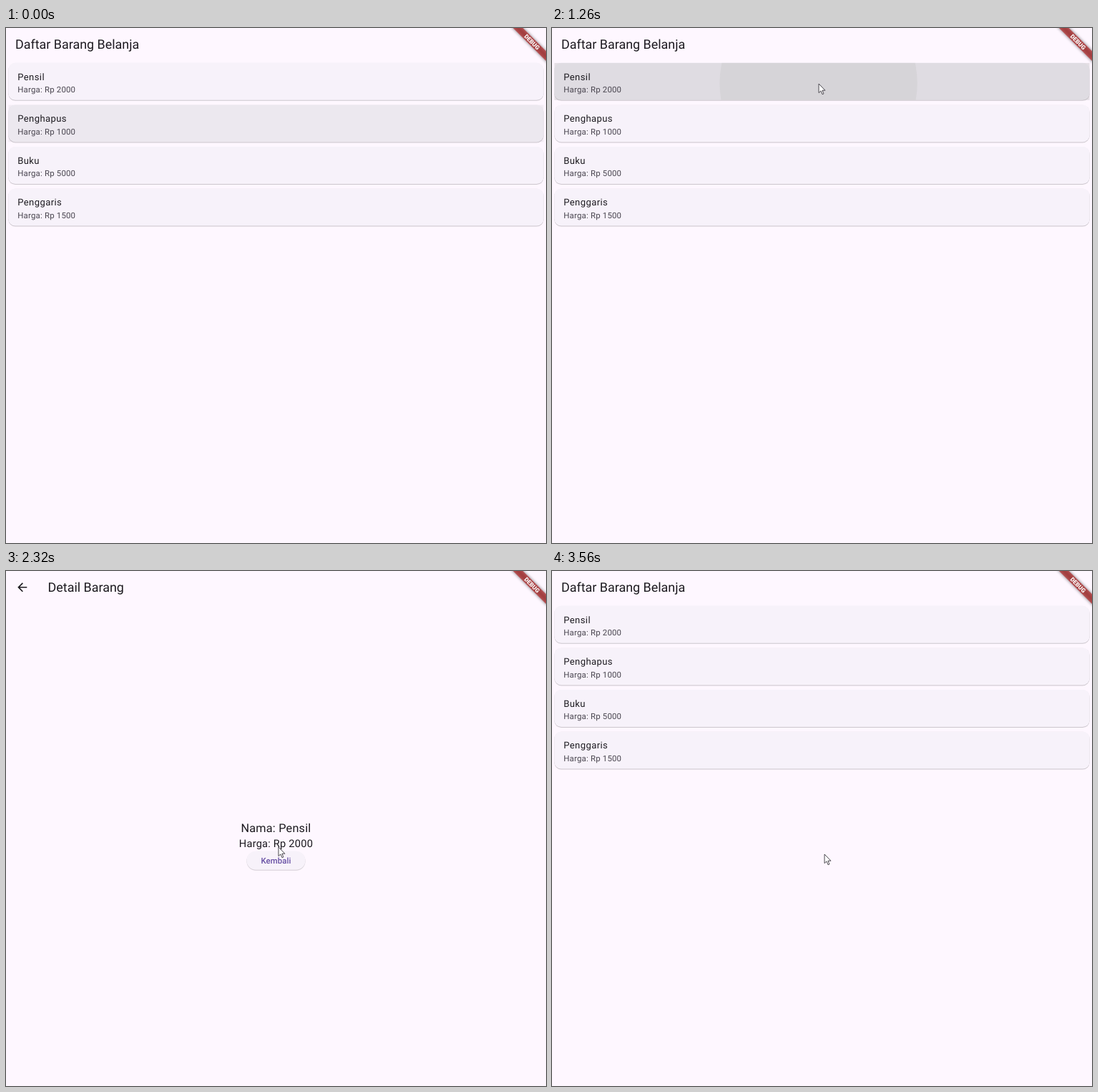
An HTML page for the animation above (3640 ms loop, 755x720 px).

```html
<!DOCTYPE html>
<html lang="id">
<head>
<meta charset="utf-8">
<title>Daftar Barang Belanja</title>
<style>
  html, body { margin: 0; width: 100%; height: 100%; overflow: hidden; background: #fef7ff; }
  svg { display: block; width: 100vw; height: 100vh; }
  text { font-family: Roboto, sans-serif; fill: #1d1b20; text-rendering: geometricPrecision; }
  .bar { font-size: 22px; }
  .name { font-size: 16px; letter-spacing: .5px; }
  .price { font-size: 14px; letter-spacing: .25px; fill: #49454f; }
  .mid { text-anchor: middle; letter-spacing: .25px; }
  .label { font-size: 14px; font-weight: 500; letter-spacing: .1px; text-anchor: middle; fill: #6750a4; }
  .card { fill: #f7f2fa; filter: drop-shadow(0 1px .8px rgba(0, 0, 0, .24)); }
  .banner { font-size: 10.2px; font-weight: 900; text-anchor: middle; fill: #fff; }
  .cursor path { fill: #fff; stroke: #37343c; stroke-width: .9; stroke-linejoin: round; }
</style>
</head>
<body>
<svg viewBox="0 0 755 720">
  <defs>
    <clipPath id="rowClip"><rect x="4" y="60" width="920" height="64"/></clipPath>
    <clipPath id="btnClip"><rect x="413.5" y="481.5" width="101" height="32" rx="16"/></clipPath>
    <filter id="soft" x="-20%" y="-100%" width="140%" height="300%"><feGaussianBlur stdDeviation="2.6"/></filter>
  </defs>
  <rect width="755" height="720" fill="#fef7ff"/>
  <g transform="scale(.8135)">
    <g id="list">
      <rect width="929" height="886" fill="#fef7ff"/>
      <text class="bar" x="16" y="35.3">Daftar Barang Belanja</text>
      <g id="rows"></g>
    </g>
    <rect id="scrim" width="929" height="886" fill="#fef7ff"/>
    <g id="detail">
      <rect width="929" height="886" fill="#fef7ff"/>
      <path transform="translate(16 16)" fill="#1d1b20" d="M20 11H7.83l5.59-5.59L12 4l-8 8 8 8 1.41-1.41L7.83 13H20z"/>
      <text class="bar" x="72" y="35.3">Detail Barang</text>
      <text class="mid" x="464" y="448.2" font-size="20">Nama: Pensil</text>
      <text class="mid" x="464" y="474.8" font-size="18">Harga: Rp 2000</text>
      <rect id="btn" x="413.5" y="481.5" width="101" height="32" rx="16" fill="#f7f2fa"/>
      <g clip-path="url(#btnClip)" fill="#6750a4">
        <rect id="btnHover" x="413.5" y="481.5" width="101" height="32"/>
        <circle id="btnRipple" cx="468.5" cy="496"/>
      </g>
      <text class="label" x="464" y="502.5">Kembali</text>
    </g>
    <g transform="translate(928 0) rotate(45)">
      <rect x="-44" y="28" width="88" height="12" fill="#000" opacity=".5" filter="url(#soft)"/>
      <rect x="-44" y="28" width="88" height="12" fill="#b71c1c" opacity=".63"/>
      <text class="banner" x="0" y="37.6">DEBUG</text>
    </g>
  </g>
  <g id="cursor" class="cursor">
    <path id="arrow" d="M0 0V12.6L2.9 9.9 5 14.7 6.9 13.9 4.9 9.2H8.9Z"/>
    <path id="hand" d="M-1.3 1.2C-1.3-.3 1.3-.3 1.3 1.2V5.6C1.6 4.6 3.6 4.8 3.6 6.1 4 5.2 5.7 5.5 5.7 6.8 6.2 6 7.6 6.4 7.6 7.6V11.4C7.6 13.2 6.2 14 6.2 16.3H-1.4C-1.4 14.3-4.4 12-5.2 9.3-5.5 8-3.9 7.6-3 8.8L-1.3 10.6Z"/>
  </g>
</svg>
<script>
const LOOP = 3640;
const PUSH = 1202, PUSH_SHOWN = 1300, POP = 3240, ZOOM = 300;
const TAP = 1160, BTN_HOVER = 2760, BTN_TAP = 3140;
const $ = id => document.getElementById(id);
const set = (el, attrs) => { for (const k in attrs) el.setAttribute(k, attrs[k]); };
const clamp = x => Math.max(0, Math.min(1, x));
const ramp = (t, from, span) => clamp((t - from) / span);
const mix = (a, b, p) => a + (b - a) * p;

const items = [['Pensil', 2000], ['Penghapus', 1000], ['Buku', 5000], ['Penggaris', 1500]];
$('rows').innerHTML = items.map(([name, price], i) => `
  <g transform="translate(0 ${i * 72})">
    <rect class="card" x="4" y="60" width="920" height="64" rx="12"/>
    <rect id="hover${i}" x="4" y="60" width="920" height="64" opacity="0"/>
    ${i ? '' : `<g clip-path="url(#rowClip)">
      <rect id="press" x="4" y="60" width="920" height="64" fill="#bcbcbc"/>
      <circle id="ripple" cx="458" cy="95" fill="#c8c8c8"/>
    </g>`}
    <text class="name" x="20" y="89.3">${name}</text>
    <text class="price" x="20" y="110.7">Harga: Rp ${price}</text>
  </g>`).join('');

// Cubic Bezier through four points, solved for y at a given x.
function bezier(x, [x0, y0, x1, y1, x2, y2, x3, y3]) {
  const at = (a, b, c, d, u) => {
    const v = 1 - u;
    return v * v * v * a + 3 * v * v * u * b + 3 * v * u * u * c + u * u * u * d;
  };
  let lo = 0, hi = 1;
  for (let i = 0; i < 24; i++) {
    const u = (lo + hi) / 2;
    if (at(x0, x1, x2, x3, u) < x) lo = u; else hi = u;
  }
  return at(y0, y1, y2, y3, lo);
}
const ease = x => bezier(x, [0, 0, .25, .1, .25, 1, 1, 1]);
const easeInOut = x => bezier(x, [0, 0, .42, 0, .58, 1, 1, 1]);
const zoomEase = x => x < .198
  ? bezier(x, [0, 0, .056, .024, .108, .3085, .198, .541])
  : bezier(x, [.198, .541, .3655, 1, .5465, .989, 1, 1]);

const zoom = s => `translate(464 442.5) scale(${s}) translate(-464 -442.5)`;

function drawPages(t) {
  let listScale = 1, detailScale = 1, detailAlpha = 0, scrim = 0;
  if (t >= POP) {
    const p = ramp(t, POP, ZOOM), z = zoomEase(p);
    listScale = mix(1.1, 1, z);
    detailScale = mix(1, .9, z);
    detailAlpha = 1 - ramp(p, .0825, .125);
  } else if (t >= PUSH_SHOWN) {
    const p = ramp(t, PUSH, ZOOM), z = zoomEase(p);
    listScale = mix(1, 1.05, z);
    detailScale = mix(.85, 1, z);
    detailAlpha = ramp(p, .125, .125);
    scrim = .6 * ramp(p, .2075, .21);
  }
  set($('list'), { transform: zoom(listScale) });
  set($('scrim'), { opacity: scrim });
  set($('detail'), { transform: zoom(detailScale), opacity: detailAlpha });
}

function drawInk(t) {
  const live = t < 1600;
  set($('hover0'), { opacity: live ? .045 * ramp(t, 59, 50) : 0 });
  set($('hover1'), { opacity: .045 * (1 - ramp(t, 60, 50)) });
  set($('press'), { opacity: live ? .4 * ramp(t, TAP, 150) : 0 });
  set($('ripple'), {
    r: mix(138.6, 462, ease(ramp(t, TAP, 1000))),
    opacity: live ? .4 * ramp(t, TAP, 75) : 0
  });
  const over = ramp(t, BTN_HOVER, 100);
  set($('btnHover'), { opacity: .08 * over });
  set($('btnRipple'), {
    r: mix(16, 60, ease(ramp(t, BTN_TAP, 225))),
    opacity: .1 * ramp(t, BTN_TAP, 75)
  });
  $('btn').style.filter =
    `drop-shadow(0 ${mix(1, 1.6, over)}px ${mix(.9, 1.5, over)}px rgba(0,0,0,${mix(.2, .32, over)}))`;
}

function pointer(t) {
  if (t >= POP + 60) return [381, 396];
  if (t >= BTN_HOVER) return [381.7, mix(397, 401.3, easeInOut(ramp(t, BTN_HOVER, 200)))];
  if (t >= 2440) return [381, 390];
  if (t >= 2320) return [381, 386];
  const p = easeInOut(ramp(t, 1780, 440));
  return [mix(373, 380, p) + 12 * Math.sin(Math.PI * p), mix(78, 372, p)];
}

function drawCursor(t) {
  const hand = t >= BTN_HOVER && t < POP + 60;
  const [x, y] = pointer(t);
  set($('cursor'), { transform: `translate(${x} ${y})`, opacity: t < 60 ? 0 : 1 });
  set($('arrow'), { opacity: hand ? 0 : 1 });
  set($('hand'), { opacity: hand ? 1 : 0 });
}

function draw(t) {
  drawPages(t);
  drawInk(t);
  drawCursor(t);
}

const start = performance.now();
function tick() {
  draw((performance.now() - start) % LOOP);
  requestAnimationFrame(tick);
}
tick();
</script>
</body>
</html>
```
